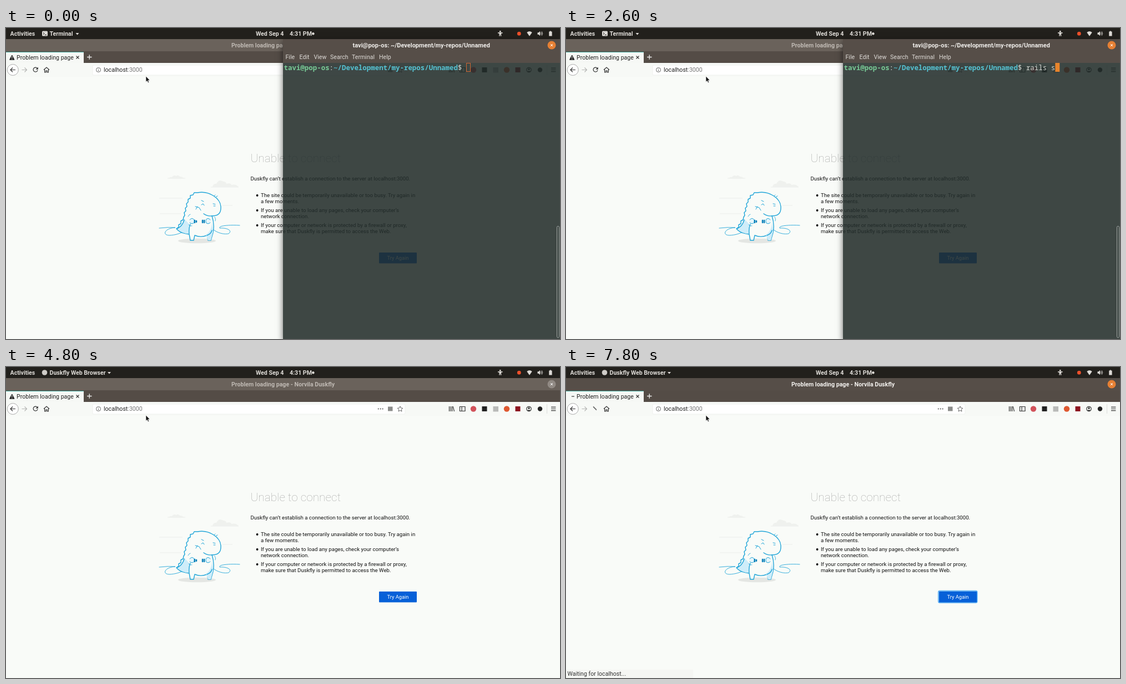
An HTML page that plays this animation: 998 by 561 pixels, repeating every 8 s.

```html
<!DOCTYPE html>
<html lang="en">
<head>
<meta charset="utf-8">
<title>Starting a local server</title>
<style>
html, body { margin: 0; width: 998px; height: 561px; overflow: hidden; background: #f9fbf8; }
svg { position: absolute; left: 0; top: 0; display: block; }
text { font-family: Roboto, sans-serif; font-size: 10.6px; white-space: pre; }
.b { font-weight: 700; }
.bar text { font-size: 10.6px; font-weight: 700; fill: #dedbd7; }
.page text { font-size: 9.65px; fill: #111; }
.page .h1 { font-size: 20.8px; font-weight: 200; fill: #a9aaa8; }
.line { fill: none; stroke: #333; stroke-width: 1.2; }
.fine { stroke: #555; stroke-width: .9; }
.mid { text-anchor: middle; }

.term { position: absolute; left: 499px; top: 20px; width: 499px; height: 541px;
  box-shadow: 0 4px 11px rgba(0,0,0,.6); }
.screen { position: absolute; inset: 43px 0 0; background: rgba(34,44,42,.87); }
pre { position: absolute; left: 1.5px; top: 43.7px; margin: 0; color: #d6d9d4;
  font: 12.44px/15.57px 'Noto Sans Mono', monospace; }
.user { color: #78cb96; font-weight: 700; }
.path { color: #55c3d3; font-weight: 700; }
.typed { display: inline-block; height: 15.57px; overflow: hidden; vertical-align: top; }
.hollow, .block { position: absolute; left: 330px; top: 43.4px; width: 8px; height: 16px; box-sizing: border-box; }
.hollow { border: 1px solid #cf6531; }
.block { background: #e8842c; }
.scroll { position: absolute; right: 1px; top: 337px; width: 5px; height: 202px;
  box-sizing: border-box; border: 1px solid #a3a8a5; border-radius: 2.5px; }

.term, .user-app, .web-app, .hollow, .block, .typed, .boot, .ready,
.head, .title, .close, .ring, .idle, .busy, .status, .dash, .slash {
  animation: 8s step-end infinite; }
.term, .user-app { animation-name: until-switch; }
.web-app { animation-name: from-switch; }
.hollow { animation-name: hollow; }
.block { animation-name: block; }
.typed { animation-name: type; }
.boot { animation-name: boot; }
.ready { animation-name: ready; }
.head { animation-name: head; }
.title { animation-name: title; }
.close { animation-name: close; }
.ring { animation-name: ring; }
.idle { animation-name: idle; }
.busy { animation-name: busy; }
.status { animation-name: status; }
.dash { animation-name: dash; }
.slash { animation-name: slash; }

@keyframes until-switch { 0% { opacity: 1 } 60%, 100% { opacity: 0 } }
@keyframes from-switch { 0% { opacity: 0 } 60%, 100% { opacity: 1 } }
@keyframes hollow { 0% { opacity: 1 } 2.5%, 100% { opacity: 0 } }
@keyframes type {
  0% { width: 0 } 17.5% { width: 2ch } 20% { width: 3ch } 22.5% { width: 4ch }
  25% { width: 5ch } 27.5% { width: 6ch } 32.5%, 100% { width: 7ch }
}
@keyframes block {
  0% { opacity: 0; transform: none }
  2.5% { opacity: 1; transform: none }
  7.5% { opacity: 0; transform: none }
  15% { opacity: 1; transform: none }
  17.5% { opacity: 1; transform: translateX(14.9px) }
  20% { opacity: 1; transform: translateX(22.4px) }
  22.5% { opacity: 1; transform: translateX(29.9px) }
  25% { opacity: 1; transform: translateX(37.3px) }
  27.5% { opacity: 1; transform: translateX(44.8px) }
  32.5% { opacity: 1; transform: translateX(52.3px) }
  40% { opacity: 1; transform: translate(-328.7px, 15.6px) }
  45% { opacity: 1; transform: translate(-328.7px, 62.3px) }
  47.5% { opacity: 1; transform: translate(-328.7px, 155.7px) }
  55% { opacity: 0; transform: translate(-328.7px, 155.7px) }
  57.5%, 100% { opacity: 1; transform: translate(-328.7px, 155.7px) }
}
@keyframes boot { 0% { opacity: 0 } 45%, 100% { opacity: 1 } }
@keyframes ready { 0% { opacity: 0 } 47.5%, 100% { opacity: 1 } }
@keyframes head { 0% { fill: #6a625b } 62.5%, 100% { fill: #564e48 } }
@keyframes title { 0% { fill: #bfb9b3 } 62.5%, 100% { fill: #f3f1ee } }
@keyframes close { 0% { fill: #918a84 } 62.5%, 100% { fill: #e68034 } }
@keyframes ring { 0% { opacity: 0 } 65%, 100% { opacity: 1 } }
@keyframes idle { 0% { opacity: 1 } 92.5%, 100% { opacity: 0 } }
@keyframes busy { 0% { opacity: 0 } 92.5%, 100% { opacity: 1 } }
@keyframes status { 0% { opacity: 0 } 95%, 100% { opacity: 1 } }
@keyframes dash { 0% { transform: translateX(-4px) } 95% { transform: translateX(-2px) } 97.5%, 100% { transform: none } }
@keyframes slash { 0% { transform: scale(.4) } 95% { transform: scale(.7) } 97.5%, 100% { transform: none } }
</style>
</head>
<body>
<svg width="998" height="561" viewBox="0 0 998 561">
  <rect width="998" height="561" fill="#f9fbf8"/>

  <!-- Window frame and tabs -->
  <rect class="head" y="20" width="998" height="23" fill="#6a625b"/>
  <rect y="42" width="998" height="21" fill="#544c46"/>
  <text class="title b mid" x="499" y="34.5">Problem loading page - Norvila Duskfly</text>
  <circle class="close" cx="983" cy="31" r="7.5"/>
  <path d="M981 29l4 4m0-4l-4 4" stroke="#fff"/>
  <path d="M0 43h140v20H0z" fill="#f6f8f5"/>
  <path d="M0 43h140v1H0z" fill="#45aaa0"/>
  <path class="idle" d="M10.8 49l4.2 8.2H6.6z" fill="#222" stroke="#222" stroke-linejoin="round"/>
  <path class="idle" d="M10.8 51v3.4m0 1v1.2" stroke="#fff"/>
  <g class="busy"><path class="dash" d="M10 53h5" stroke="#444" stroke-width="1.3"/></g>
  <text x="19" y="56.7" fill="#222">Problem loading page</text>
  <path d="M126.5 50.5l5 5m0-5l-5 5" class="line"/>
  <path d="M146 52.5h8.5m-4.25-4.25v8.5" stroke="#eee" stroke-width="1.3"/>

  <!-- Toolbar -->
  <rect y="63" width="998" height="25" fill="#f7f9f6"/>
  <rect x="156" y="67" width="563" height="18" rx="2" fill="#fff" stroke="#eff1ee"/>
  <circle cx="12.3" cy="75.5" r="10" fill="#fff" stroke="#aaa"/>
  <path class="line" d="M17 75.5H8m4-4l-4 4 4 4"/>
  <path class="line" d="M28.5 75.5h9m-4-4l4 4-4 4" style="stroke:#b5b6b4"/>
  <g class="idle"><path class="line" d="M56 72.4a4 4 0 1 0 1 3.8"/><path d="M57.8 70.5v4.3h-4.3z" fill="#333"/></g>
  <g class="busy" transform="translate(52 74.5)"><path class="slash line" d="M-3-3l6 6"/></g>
  <path class="line" d="M68 75.5l5-4.5 5 4.5M69.6 75v5h2.3v-3h2.2v3h2.3v-5"/>
  <circle class="line fine" cx="166.5" cy="75.5" r="4"/>
  <path d="M166.5 73v1m0 1v3" stroke="#777"/>
  <text x="176" y="79.2" fill="#222">localhost<tspan fill="#777">:3000</tspan></text>
  <g fill="#555"><circle cx="670.8" cy="75.5" r="1.1"/><circle cx="674.7" cy="75.5" r="1.1"/><circle cx="678.6" cy="75.5" r="1.1"/></g>
  <rect x="688" y="71.5" width="8.5" height="8" fill="#8b8c8a"/>
  <path class="line fine" d="M710 70.8l1.4 3.1 3.4.4-2.5 2.4.7 3.4-3-1.8-3 1.8.7-3.4-2.5-2.4 3.4-.4z"/>
  <path class="line" d="M798.5 71v9m2.6-9v9m2.6-9v9m1.5-8.8l2.3 8.8"/>
  <path class="line" d="M817.5 71.5h9.5v8h-9.5zm3.6 0v8"/>
  <circle cx="842" cy="75.5" r="5.2" fill="#d2525b"/>
  <rect x="857.5" y="71" width="9" height="9" fill="#222"/>
  <rect x="877.5" y="71" width="9.5" height="9.5" fill="#b9bab8"/>
  <circle cx="902" cy="75.5" r="5.2" fill="#df5830"/>
  <rect x="917.5" y="71" width="9" height="9" fill="#8d1420"/>
  <circle class="line" cx="942" cy="75.5" r="4.2"/><circle cx="942" cy="74.2" r="1.7" fill="#333"/>
  <path d="M939 77.5h6l-1.5 1.8h-3z" fill="#333"/>
  <circle cx="962" cy="75.5" r="4.2" fill="#222"/>
  <path d="M974.5 67v17" stroke="#dcdddb"/>
  <path class="line" d="M982 72.4h8.4m-8.4 3.1h8.4m-8.4 3.1h8.4"/>

  <!-- Illustration -->
  <path d="M291 271h32M276 307h42M277 335h38M369 287h50M390 320h18" stroke="#eceeeb" fill="none"/>
  <path d="M293 272q2-4 6-3 3-5 8-2 3-3 6 1 5 0 8 4zM372 287q1-7 7-6 4-9 13-4 4 0 5 4 8-2 9 2 9-2 13 4z" fill="#eff1ee"/>
  <ellipse cx="344" cy="384" rx="34" ry="4.3" fill="#e4e6e3"/>
  <g fill="none" stroke="#20a5d8" stroke-width="1.4" stroke-linejoin="round" stroke-linecap="round">
    <path d="M276 361q16-2 29-1c-19 1-25 14-10 14 18-1 35-9 39-24M421 356c-15-1-39 0-36 5 12-1 24 4 16 10-14 3-34-7-39-22" stroke-width=".9"/>
    <path d="M345 297c20-4 43 10 42 28 0 11-8 14-16 14 3 9 4 20 2 30l-4 14h-5l-2-9c-7 3-15 3-22 0l-2 9h-6l-2-11c-10-1-19-5-23-10l4-3v-4l4-2 0-5 4-2 1-5 2-3-1-5 3-3-1-5 3-3-1-5 3-3 0-5 4-2 0-5 5-1 2-4z" fill="#f9fbf8"/>
    <path d="M322 345q-4 12-14 17 9 9 22 9l1-16zM371 347c1 12-4 22-11 26l4 10h5l4-15z" fill="#cfedf9" stroke="none"/>
    <path d="M330 371q-1-10 2-17m-24 8q10-4 13-16M362 374q7-2 9-9M356 335q7 5 15 4"/>
    <path d="M352 311l4 2m-4 6l3-2 2 3m16-3l4 1m-3 3h3m-36 1l7 2 3 5m-9-2l3-5M375 303l2-2m1 4l3-2" stroke-width="1"/>
    <path d="M331 346q4-5 8 0v5q-4 4-8 0m37-5q-4-5-8 0v5q4 4 8 0" fill="#e7f6fb" stroke-width="1"/>
    <path d="M340 347v4m3-3v2m11-3v4m3-4v4" stroke="#087fb9" stroke-width="2.4"/>
    <path d="M328 340q2-4 4-4m-3 19q3 3 6 2M376 341q3 4 1 7" stroke-width=".8"/>
  </g>

  <!-- Error text -->
  <g class="page">
    <text class="h1" x="440.5" y="242">Unable to connect</text>
    <text x="440.5" y="275">Duskfly can’t establish a connection to the server at localhost:3000.</text>
    <text x="459" y="305">The site could be temporarily unavailable or too busy. Try again in</text>
    <text x="459" y="316">a few moments.</text>
    <text x="459" y="332">If you are unable to load any pages, check your computer’s</text>
    <text x="459" y="343">network connection.</text>
    <text x="459" y="359">If your computer or network is protected by a firewall or proxy,</text>
    <text x="459" y="370">make sure that Duskfly is permitted to access the Web.</text>
    <circle cx="452.6" cy="302" r="1.9"/><circle cx="452.6" cy="329" r="1.9"/><circle cx="452.6" cy="356" r="1.9"/>
    <g class="ring" fill="none">
      <rect x="670" y="403" width="71.5" height="23" rx="3" stroke="#c3e3fa"/>
      <rect x="671" y="404" width="69.5" height="21" rx="2" stroke="#46a3f0" stroke-width="1.4"/>
    </g>
    <rect x="672" y="405" width="68" height="19.5" rx="1" fill="#0760d8"/>
    <text class="mid" x="706" y="418" style="fill:#fff;font-size:9.3px">Try Again</text>
  </g>
  <g class="status">
    <rect y="546" width="229" height="15" fill="#f5f6f3"/>
    <text x="2.5" y="557.2" fill="#333">Waiting for localhost...</text>
  </g>

  <!-- Desktop bar -->
  <g class="bar">
    <rect width="998" height="20" fill="#22201c"/>
    <text x="7.5" y="13.8">Activities</text>
    <g class="user-app">
      <rect x="65" y="5.5" width="10" height="9" rx="1.5" fill="#dedbd7"/>
      <path d="M67 8l2 2-2 2m3 .3h3" fill="none" stroke="#22201c"/>
      <text x="78.5" y="13.8">Terminal</text>
      <path d="M125.5 9h6l-3 3.4z" fill="#dedbd7"/>
    </g>
    <g class="web-app">
      <circle cx="69.5" cy="10" r="4.8" fill="#cfccc8"/>
      <text x="78.5" y="13.8">Duskfly Web Browser</text>
      <path d="M183 9h6l-3 3.4z" fill="#dedbd7"/>
    </g>
    <text x="450" y="13.8">Wed Sep 4</text>
    <text x="511" y="13.8">4:31 PM</text>
    <g fill="#dedbd7">
      <circle cx="553.3" cy="10.2" r="2.3"/>
      <circle cx="890.3" cy="6.2" r="1.5"/>
      <path d="M886 8h8.6v1.4l-2.6.4.3 5h-1.3l-.4-3h-.6l-.4 3h-1.3l.3-5-2.6-.4z"/>
      <path d="M938.3 8q4.7-4 9.4 0l-4.7 6.8z"/>
      <path d="M957.5 8.3h2l2.7-2.6v8.6l-2.7-2.6h-2z"/>
      <path d="M978.2 6.6h1.4V5.4h2.4v1.2h1.6v8h-5.4z"/>
    </g>
    <path d="M963.6 8q1.5 2 0 4m1.5-5.7q3 3.7 0 7.4" fill="none" stroke="#dedbd7"/>
    <circle cx="924.3" cy="10.2" r="3.4" fill="#ed4f2a"/>
  </g>

  <path d="M252 87v10.2l2.3-2 1.7 3.6 1.6-.8-1.6-3.4 3.1-.2z" fill="#111" stroke="#fff" stroke-width=".6"/>
</svg>

<div class="term">
  <div class="screen"></div>
  <svg width="499" height="43" viewBox="499 20 499 43">
    <rect x="499" y="20" width="499" height="43" fill="#564e48"/>
    <text class="b mid" x="748.3" y="34.5" fill="#f0eeeb" style="font-size:11px">tavi@pop-os: ~/Development/my-repos/Unnamed</text>
    <circle cx="983" cy="31" r="7.5" fill="#e68034"/>
    <path d="M981 29l4 4m0-4l-4 4" stroke="#fff"/>
    <g fill="#dfdcd8">
      <text x="503.5" y="56.2">File</text>
      <text x="528.5" y="56.2">Edit</text>
      <text x="554.5" y="56.2">View</text>
      <text x="584" y="56.2">Search</text>
      <text x="623" y="56.2">Terminal</text>
      <text x="672" y="56.2">Help</text>
    </g>
  </svg>
  <div class="hollow"></div>
  <div class="block"></div>
<pre><span class="user">tavi@pop-os</span>:<span class="path">~/Development/my-repos/Unnamed</span>$ <span class="typed">rails s</span>
<span class="boot">=&gt; Booting Puma
=&gt; Rails 5.2.3 application starting in development
=&gt; Run `rails server -h` for more startup options</span>
<span class="ready">Puma starting in single mode...
* Version 3.12.1 (ruby 2.6.3-p62), codename: Llamas in Pajamas
* Min threads: 5, max threads: 5
* Environment: development
* Listening on tcp://localhost:3000
Use Ctrl-C to stop</span></pre>
  <div class="scroll"></div>
</div>
</body>
</html>
```
